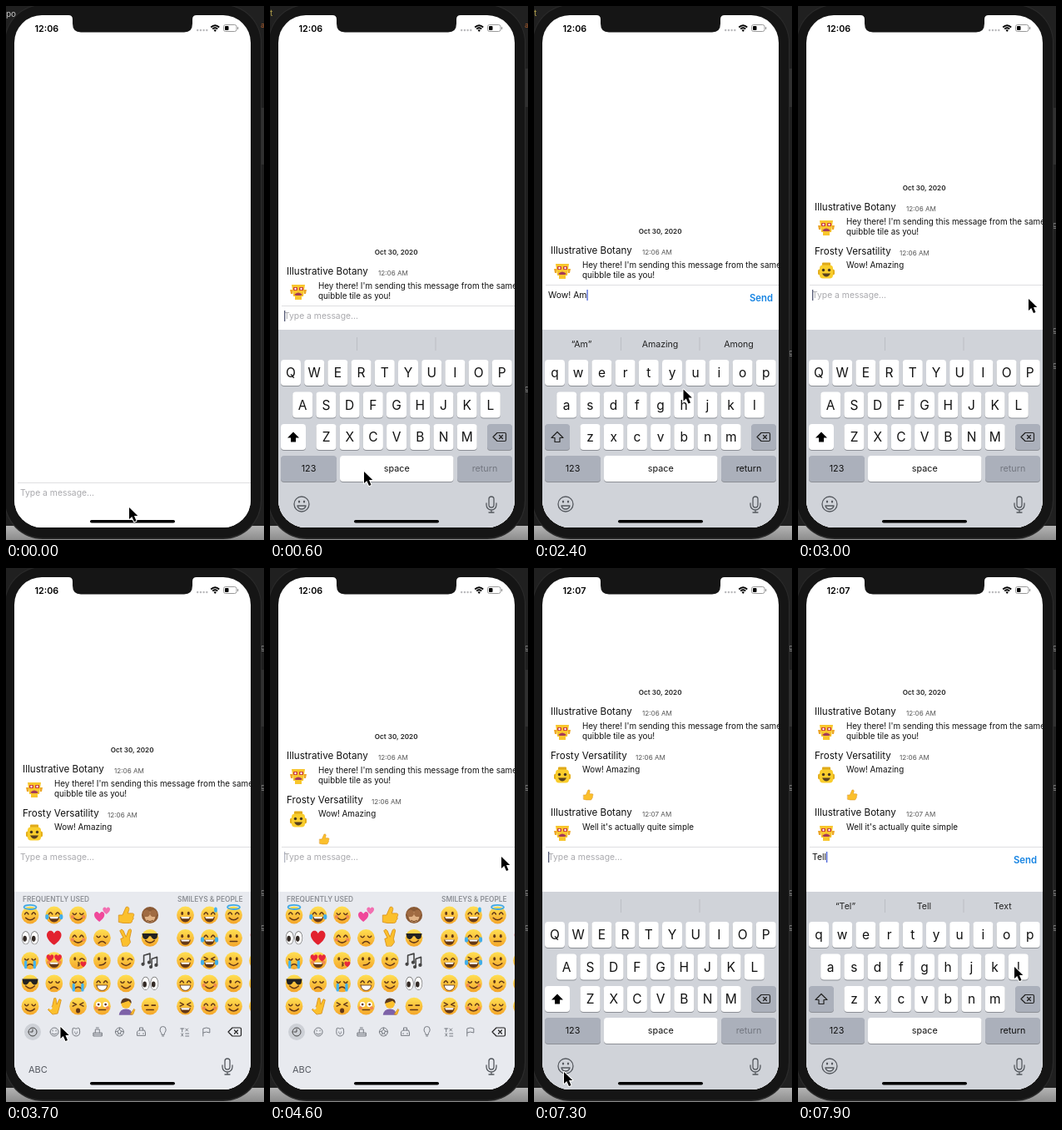
An HTML page with a canvas for the animation above (8 s loop, 310 px wide and 640 px high).

```html
<!DOCTYPE html>
<html lang="en">
<head>
<meta charset="utf-8">
<title>Chat on a phone</title>
<style>
html, body { margin: 0; width: 310px; height: 640px; overflow: hidden; background: #1c1c1c; }
canvas { display: block; width: 310px; height: 640px; }
</style>
</head>
<body>
<canvas id="stage"></canvas>
<script>
const LOOP = 8000, STEP = 100;
const SANS = 'Inter, "Liberation Sans", sans-serif';
const canvas = document.getElementById('stage');
const c = canvas.getContext('2d');
const dpr = window.devicePixelRatio || 1;
canvas.width = 310 * dpr;
canvas.height = 640 * dpr;

// [time, typed text, keyboard, suggestions]
const STATES = [
  [0, '', 'upper', []],
  [1000, 'W', 'lower', ['“W”', 'We', 'What']],
  [1200, 'Wo', 'lower', ['“Wo”', 'Would', 'Wow']],
  [1400, 'Wow', 'lower', ['“Wow”', 'wow', '*']],
  [1600, 'Wow', 'digits', ['“Wow”', 'wow', '*']],
  [1800, 'Wow!', 'digits', []],
  [1900, 'Wow! ', 'upper', ['I', 'The', 'This']],
  [2100, 'Wow! A', 'lower', ['“A”', 'And', 'Are']],
  [2300, 'Wow! Am', 'lower', ['“Am”', 'Amazing', 'Among']],
  [2500, 'Wow! Amazing ', 'lower', ['', '', '*']],
  [2800, '', 'upper', []],
  [3600, '', 'emoji', []],
  [3900, '👍', 'emoji', []],
  [4300, '', 'emoji', []],
  [7300, '', 'upper', []],
  [7500, 'T', 'lower', ['“T”', 'The', 'This']],
  [7600, 'Te', 'lower', ['“Te”', 'Tell', 'Text']],
  [7700, 'Tel', 'lower', ['“Tel”', 'Tell', 'Text']],
  [7900, 'Tell', 'lower', ['“Tel”', 'Tell', 'Text']]
];
const POINTER = [
  [0, 148, 601], [100, 140, 588], [600, 113, 558], [1000, 50, 438], [1200, 249, 438],
  [1400, 52, 438], [1550, 46, 553], [1700, 211, 517], [1800, 188, 516], [1900, 150, 552],
  [2100, 38, 477], [2300, 207, 515], [2500, 152, 404], [2700, 275, 350], [2800, 277, 351],
  [3100, 277, 351], [3500, 38, 597], [3600, 38, 597], [3900, 144, 416], [4000, 144, 416],
  [4300, 278, 346], [6000, 278, 346], [6300, 165, 528], [6500, 116, 575], [6900, 36, 604],
  [7300, 36, 604], [7500, 137, 438], [7600, 81, 438], [7700, 260, 478], [8000, 260, 478]
];
const FIELD_Y = [[200, 571], [500, 359], [1000, 359], [1200, 334]];
const THREAD_Y = [[200, 507], [500, 295], [1000, 295], [1200, 270], [2800, 270], [3000, 218],
  [4300, 218], [4500, 202], [5900, 202], [6100, 149]];
const BOARD_Y = [[200, 252], [500, 0]];

function tween(keys, t, n = 1) {
  let i = 0;
  while (i < keys.length - 1 && keys[i + 1][0] <= t) i++;
  const a = keys[i], b = keys[i + 1];
  if (!b || t <= a[0]) return a[n];
  const p = (t - a[0]) / (b[0] - a[0]);
  return a[n] + (b[n] - a[n]) * p * p * (3 - 2 * p);
}

function text(s, x, y, size, color = '#111', weight = 400, align = 'left') {
  c.font = `${weight} ${size}px ${SANS}`;
  c.textAlign = align;
  c.fillStyle = color;
  c.fillText(s, x, y + size * 0.36);
}
function box(x, y, w, h, r, color) {
  c.beginPath();
  c.roundRect(x, y, w, h, r);
  c.fillStyle = color;
  c.fill();
}
function disc(x, y, rx, color, ry = rx) {
  c.beginPath();
  c.ellipse(x, y, rx, ry, 0, 0, 7);
  c.fillStyle = color;
  c.fill();
}
function stroke(d, color, width = 1) {
  c.strokeStyle = color;
  c.lineWidth = width;
  c.stroke(new Path2D(d));
}
function fill(d, color) {
  c.fillStyle = color;
  c.fill(new Path2D(d));
}
function at(x, y, scale, draw) {
  c.save();
  c.translate(x, y);
  c.scale(scale, scale);
  c.lineCap = c.lineJoin = 'round';
  draw();
  c.restore();
}

// Emoji, each about 20 units across
const INK = '#633817';
const HEART = 'M0 8C-13 -1 -8 -9 -3 -8Q-1 -7 0 -5Q1 -7 3 -8C8 -9 13 -1 0 8z';
const EYES = {
  o: () => [-3.6, 3.6].forEach(x => disc(x, -2, 1.4, INK, 2)),
  n: () => stroke('M-6 -1q2 -4 4 0M2 -1q2 -4 4 0', INK, 1.5),
  u: () => stroke('M-6 -2q2 3 4 0M2 -2q2 3 4 0', INK, 1.4),
  l: () => stroke('M-6 -1h4M2 -1h4', INK, 1.5),
  i: () => { disc(-3.6, -2, 1.4, INK, 2); stroke('M2 -1q2 -3 5 0', INK, 1.5); },
  x: () => stroke('M-6 -4l4 2l-4 2M6 -4l-4 2l4 2', INK, 1.4),
  g: () => fill('M-9 -5H9L8 0Q4 4 1 -2H-1Q-4 4 -8 0z', '#222'),
  w: () => [-4, 4].forEach(x => { disc(x, -2, 3, '#fff'); disc(x, -2, 1.3, INK); }),
  h: () => [-4.5, 4.5].forEach(x => at(x, -3, 0.5, () => fill(HEART, '#e8283b'))),
  s: () => [-4.5, 4.5].forEach(x => at(x, -3, 0.5, () => fill('M0 -9L3 -3L9 -2L4 2L6 9L0 5L-6 9L-4 2L-9 -2L-3 -3z', '#f1662b')))
};
const MOUTHS = {
  s: () => stroke('M-5 3q5 5 10 0', INK, 1.4),
  D: () => { fill('M-6 2H6Q5 8 0 8T-6 2z', INK); fill('M-5 2H5L4 4H-4z', '#fff'); },
  T: () => { fill('M-6 2H6Q5 8 0 8T-6 2z', '#fff'); stroke('M-6 2H6Q5 8 0 8T-6 2z', INK, 0.8); },
  f: () => stroke('M-4 6q4 -4 8 0', INK, 1.4),
  l: () => stroke('M-4 4h8', INK, 1.4),
  r: () => stroke('M-3 5q5 0 7 -3', INK, 1.4),
  k: () => stroke('M0 2q3 1 0 2q3 1 0 2', INK, 1.2),
  O: () => disc(0, 5, 2.4, INK, 2.8)
};
const EXTRAS = {
  a: () => { c.beginPath(); c.ellipse(0, -9, 7, 2.4, 0, 0, 7); c.strokeStyle = '#42a9e3'; c.lineWidth = 1.7; c.stroke(); },
  t: () => { disc(-8, 2, 2, '#41aeea', 3); disc(8, 2, 2, '#41aeea', 3); },
  c: () => { box(-6.5, 0, 3, 9, 1, '#43b4ee'); box(3.5, 0, 3, 9, 1, '#43b4ee'); },
  b: () => { disc(-6.3, 2, 2, '#f0874f'); disc(6.3, 2, 2, '#f0874f'); },
  d: () => disc(7, -6, 1.8, '#44b3ed', 3),
  v: () => at(6, 4, 0.4, () => fill(HEART, '#e8283b'))
};
const SKIN = '#fbc02d', SKIN_EDGE = '#d98e14';
function skin(d) { fill(d, SKIN); stroke(d, SKIN_EDGE, 0.8); }
const SIGNS = {
  up: () => skin('M-8 0h4l4 -9c3 -1 4 1 3 4l-1 3h5c3 0 2 3 1 4c1 2 0 3 -1 4c0 2 -1 3 -3 3h-7l-5 -1z'),
  hearts: () => { at(-3, 2, 0.7, () => fill(HEART, '#f0489a')); at(5, -5, 0.5, () => fill(HEART, '#f26fb1')); },
  heart: () => fill(HEART, '#e2222f'),
  monkey: () => {
    disc(0, 0, 9.5, '#8a5a35'); disc(0, 2, 6, '#e0b184');
    disc(-4, -2, 4, '#a06b42'); disc(4, -2, 4, '#a06b42'); stroke('M-3 6q3 2 6 0', INK);
  },
  look: () => [-5, 5].forEach(x => { disc(x, 0, 4.6, '#666', 7.6); disc(x, 0, 4, '#fff', 7); disc(x - 1, 1, 2.2, '#332a25', 3.3); }),
  peace: () => skin('M-4 9L-6 1L-3 0L-7 -8Q-5 -11 -3 -8L0 -1L3 -9Q6 -11 6 -8L4 1L5 5L2 9z'),
  ok: () => { skin('M-2 9L-7 4L-2 0L0 -9H2L3 -2L6 -8L8 -7L6 1L4 8z'); disc(-4, 2, 1.8, '#e8eaee'); },
  notes: () => { stroke('M-7 4V-6L0 -8V2M2 7V-2L8 -4V5', '#444', 1.5); [[-8, 4], [-1, 2], [1, 7], [7, 5]].forEach(p => disc(...p, 2, '#444')); },
  person: () => { fill('M-8 10Q-7 3 0 3T7 10z', '#7d62a8'); disc(0, -3, 5.5, SKIN); fill('M-6 -3Q-5 -10 1 -9T6 -3L3 -6z', '#5b3a20'); skin('M5 9L9 3L10 4L8 9z'); }
};
function emoji(name, x, y, scale = 1.06) {
  at(x, y, scale, () => {
    if (SIGNS[name]) return SIGNS[name]();
    const g = c.createLinearGradient(0, -10, 0, 10);
    g.addColorStop(0, '#ffe052');
    g.addColorStop(1, '#f4a52a');
    disc(0, 0, 9.8, g);
    const [eyes, mouth, extra] = name;
    EYES[eyes]();
    MOUTHS[mouth]();
    if (extra) EXTRAS[extra]();
  });
}
const PANEL = [
  'nsa nDt usb hearts up monkey oD nDd nsa',
  'look heart nsb uf peace gs oD nDt ol heart',
  'ufc hDb ikv or is notes nD xDt os ns',
  'gs uf ufc nT us look nT usb is uk',
  'us ok xO wlb person ll xD nsb us os'
].map(row => row.split(' '));

function drawPanel() {
  box(10, 388, 284, 240, 0, '#e8eaef');
  text('FREQUENTLY USED', 20, 397, 8.4, '#8d9096', 600);
  text('SMILEYS & PEOPLE', 206, 397, 8.4, '#8d9096', 600);
  PANEL.forEach((row, r) => row.forEach((name, i) =>
    emoji(name, i < 6 ? 29 + i * 28.8 : 215.5 + (i - 6) * 29, 416 + r * 27.3)));
  disc(32, 556, 10, '#cdd0d6');
  const icons = [
    'M-5 0a5 5 0 1 0 10 0a5 5 0 1 0 -10 0M0 -3V0H-3',
    'M-5 0a5 5 0 1 0 10 0a5 5 0 1 0 -10 0M-2 -2v1M2 -2v1M-3 2q3 2 6 0',
    'M-4 -4a2 2 0 0 1 3 0h2a2 2 0 0 1 3 0q2 9 -4 9t-4 -9M-1.5 0v.5M1.5 0v.5M-1 2h2',
    'M-5 1H5V5H-5zM-3 1V-3H2V1M-2 -5h3M-5 3H5',
    'M-5 0a5 5 0 1 0 10 0a5 5 0 1 0 -10 0M-2 -1L0 -3L2 -1L1 2H-1zM-5 0l3 -1M5 0l-3 -1M0 -5v2M-1 2l-2 2M1 2l2 2',
    'M-5 4V0L-3 -2H4L5 1V4zM-2 -2V-5H2V-2M-3 2h1M2 2h1',
    'M-1.5 3C-1 1 -4 0 -3.5 -3A3.5 3.5 0 0 1 3.5 -3C4 0 1 1 1.5 3zM-1 5h2',
    'M-5 -4h4M-3 -4v4M1 -4l3 3M4 -4l-3 3M-4 2l2 3M-2 2l-2 3M1 2h4M1 5h4',
    'M-4 5V-4Q0 -6 4 -4V1Q0 -1 -4 1'
  ];
  icons.forEach((d, i) => at(32 + i * 26.1, 556, 1, () => stroke(d, i ? '#777b82' : '#444', 1)));
  eraser(275, 556);
  text('ABC', 27, 601, 11, '#555960');
  mic();
}

// Letter and number keyboards
function eraser(x, y) {
  at(x, y, 1, () => stroke('M-8 0L-3 -5H6Q7.5 -5 7.5 -3.5V3.5Q7.5 5 6 5H-3zM-.5 -2L3.5 2M3.5 -2L-.5 2', '#222', 1.2));
}
function mic() {
  at(266, 597, 1, () => stroke('M-3 -6a3 3 0 0 1 6 0V1a3 3 0 0 1 -6 0zM-6 -1V1a6 6 0 0 0 12 0V-1M0 7V10M-3 10H3', '#55595f', 1.3));
}
function key(x, y, w, label, size = 15.5, dark = false, ink = '#111') {
  box(x, y + 1, w, 31, 4, '#8c8f95');
  box(x, y, w, 31, 4, dark ? '#abb0bb' : '#fff');
  if (label) text(label, x + w / 2, y + 15.5, size, ink, 400, 'center');
}
function keyRow(chars, first, y, pitch = 28.2, w = 24) {
  [...chars].forEach((ch, i) => key(first + i * pitch - w / 2, y, w, ch));
}
function drawKeys(mode, words, hasText) {
  box(10, 388, 284, 240, 0, '#d0d3d9');
  box(104, 397, 1, 16, 0, '#bbbec4');
  box(198.5, 397, 1, 16, 0, '#bbbec4');
  words.forEach((word, i) => {
    if (word === '*') ['sD', 'wlb', 'oO'].forEach((e, k) => emoji(e, 215 + k * 31.5, 405, 0.7));
    else text(word, 57 + i * 94.5, 405, 10.6, '#222', 400, 'center');
  });
  const digits = mode === 'digits', upper = mode === 'upper';
  if (digits) {
    keyRow('1234567890', 25, 424);
    keyRow('-/:;()$&@”', 25, 462);
    keyRow('.,?!’', 75, 501, 38, 34);
    key(13, 501, 30, '#+=', 8.5, true);
  } else {
    const rows = ['QWERTYUIOP', 'ASDFGHJKL', 'ZXCVBNM'].map(s => upper ? s : s.toLowerCase());
    rows.forEach((s, r) => keyRow(s, [25, 39.2, 67.5][r], 424 + r * 38.5));
    key(13, 501, 30, '', 0, !upper);
    at(28, 516.5, 1, () => {
      const arrow = 'M0 -6L7 1H3V6H-3V1H-7z';
      if (upper) fill(arrow, '#000');
      else stroke(arrow, '#222', 1.2);
    });
  }
  key(261, 501, 30, '', 0, true);
  eraser(276, 516.5);
  key(13, 539, 67, digits ? 'ABC' : '123', 10.8, true);
  key(84, 539, 136.5, 'space', 10.8);
  key(225, 539, 66, 'return', 10.8, true, hasText ? '#111' : '#737780');
  at(38, 597, 1, () => {
    stroke('M-9 0a9 9 0 1 0 18 0a9 9 0 1 0 -18 0M-5 2H5Q4 6 0 6T-5 2z', '#55595f', 1.3);
    disc(-3, -3, 1.2, '#55595f', 1.6);
    disc(3, -3, 1.2, '#55595f', 1.6);
  });
  mic();
}

// Conversation
function cupHead(x, y) {
  at(x, y, 1, () => {
    fill('M-8 -8H8L6 6H4V10H-4V6H-6z', '#f8c62c');
    fill('M-10 -2H-7V3H-9zM10 -2H7V3H9z', '#eda729');
    box(-6, -5, 5, 4, 1, '#c8383c');
    box(1, -5, 5, 4, 1, '#c8383c');
    disc(-3.5, -3, 1.2, '#fff');
    disc(3.5, -3, 1.2, '#fff');
    fill('M-5 4Q0 -1 5 4L3 5H-3z', '#a43b58');
  });
}
function blockHead(x, y) {
  at(x, y, 1, () => {
    box(-5, -10, 10, 5, 1, '#e0aa19');
    box(-10, -2, 20, 7, 2, '#e4ae1a');
    box(-8, -7, 16, 16, 4, '#f9cd2c');
    disc(-3.5, -1, 1.7, '#463720');
    disc(3.5, -1, 1.7, '#463720');
    fill('M-5 3H5Q3 7 0 7T-5 3z', '#59411d');
  });
}
const HOSTS = [['Illustrative Botany', 130, cupHead], ['Frosty Versatility', 122, blockHead]];
function post(y, who, time, lines) {
  const [name, timeX, avatar] = HOSTS[who];
  text(name, 20, y, 11.65, '#111');
  text(time, timeX, y + 2.5, 8.1, '#555');
  avatar(34, y + 24);
  lines.forEach((s, i) => text(s, 58, y + 17 + i * 12, 9.85, '#111'));
}
function drawThread(t) {
  if (t < 300) return;
  const y = tween(THREAD_Y, t);
  text('Oct 30, 2020', 151.7, y, 8.15, '#222', 600, 'center');
  post(y + 23, 0, '12:06 AM', ["Hey there! I'm sending this message from the same", 'quibble tile as you!']);
  if (t >= 2800) post(y + 75.5, 1, '12:06 AM', ['Wow! Amazing']);
  if (t >= 4300) emoji('up', 65, y + 123, 0.66);
  if (t >= 5900) post(y + 144, 0, '12:07 AM', ["Well it's actually quite simple"]);
}
function drawField(t, typed) {
  const y = tween(FIELD_Y, t), mid = y + 12.5;
  box(10, y, 284, 640 - y, 0, '#fff');
  box(14, y, 280, 1, 0, '#dfdfe1');
  let end = 17.5;
  if (typed === '👍') {
    emoji('up', 23, mid, 0.66);
    end = 31;
  } else if (typed) {
    text(typed, 17, mid, 10.4);
    end = 17.5 + c.measureText(typed).width;
  } else text('Type a message...', 17, mid, 10.35, '#a9a9ad');
  if (typed) text('Send', 259, y + 16, 11.3, '#1583e2', 600);
  if (t >= 200) {
    const beat = ((t + 900) % 1000) / 1000;
    const busy = typed || t < 3600;
    c.globalAlpha = busy ? 1 : Math.max(0, Math.min(1, (0.58 - beat) / 0.18));
    box(end - 0.5, mid - 6.5, 1.3, 13, 0, typed ? '#4a62d8' : '#555a75');
    c.globalAlpha = 1;
  }
}

function drawBackdrop(t) {
  box(0, 0, 310, 640, 0, '#202020');
  const early = t >= 100 && t < 2800;
  box(305, early ? 75 : 122, 5, early ? 46 : 68, 0, '#303030');
  if (t < 100) text('po', 0, 9, 10, '#c8c8c8');
  else if (early) text('t', 0, 8, 10, '#b3a04b');
  if (t < 1000) text('a', 306, 23, 9, '#a95a2a');
  const marks = t < 100 ? [] : t < 1000 ? [458] : t < 2800 ? [415] : t < 3700 ? [262, 388, 430] : [95, 262, 388, 430];
  marks.forEach(y => text('g', 306, y, 9, '#999'));
  const g = c.createLinearGradient(0, 623, 0, 640);
  g.addColorStop(0, '#b4b4b4');
  g.addColorStop(1, '#8c8c8c');
  box(0, 623, 310, 17, 0, g);
  box(-2, -2, 309, 641, 46, '#2b2b2b');
  box(-1, -1, 307, 638.5, 45, '#151515');
}
function drawStatus(t) {
  fill('M75 11Q80 11 80 16V21Q80 31.5 90 31.5H214Q224 31.5 224 21V16Q224 11 229 11z', '#151515');
  text(t < 5000 ? '12:06' : '12:07', 34.5, 27, 10.8, '#000', 600);
  for (let i = 0; i < 4; i++) disc(230.2 + i * 3.7, 29, 1.2, '#b9b9bc');
  at(251.2, 30, 1, () => {
    c.lineCap = 'butt';
    stroke('M-5 -4.5Q0 -9 5 -4.5M-3 -2.5Q0 -5 3 -2.5', '#000', 1.7);
    fill('M0 1L-1.7 -1Q0 -2.5 1.7 -1z', '#000');
  });
  c.beginPath();
  c.roundRect(261.5, 22.5, 15.5, 8, 2.3);
  c.strokeStyle = '#999';
  c.lineWidth = 1;
  c.stroke();
  box(263, 24, 4.5, 5, 1, '#000');
  box(278, 25, 1.2, 3, 1, '#999');
}
function drawPointer(t) {
  at(tween(POINTER, t, 1), tween(POINTER, t, 2), 1, () => {
    const arrow = 'M0 0V14L3.3 11L6 17L8.5 16L6 10H10.3z';
    stroke(arrow, '#fff', 2);
    fill(arrow, '#000');
  });
}

function draw(t) {
  const [, typed, mode, words] = STATES.filter(s => s[0] <= t).pop();
  c.setTransform(dpr, 0, 0, dpr, 0, 0);
  drawBackdrop(t);
  c.save();
  c.beginPath();
  c.roundRect(10, 11, 284, 614, 33);
  c.clip();
  box(10, 11, 284, 614, 0, '#fff');
  drawThread(t);
  drawField(t, typed);
  c.save();
  c.translate(0, tween(BOARD_Y, t));
  if (mode === 'emoji') drawPanel();
  else drawKeys(mode, words, typed !== '');
  c.restore();
  box(101, 616, 102, 3.6, 1.8, '#000');
  c.restore();
  drawStatus(t);
  drawPointer(t);
}

const start = performance.now();
function frame() {
  const t = (performance.now() - start) % LOOP;
  draw(Math.floor(t / STEP) * STEP);
  requestAnimationFrame(frame);
}
frame();
</script>
</body>
</html>
```
